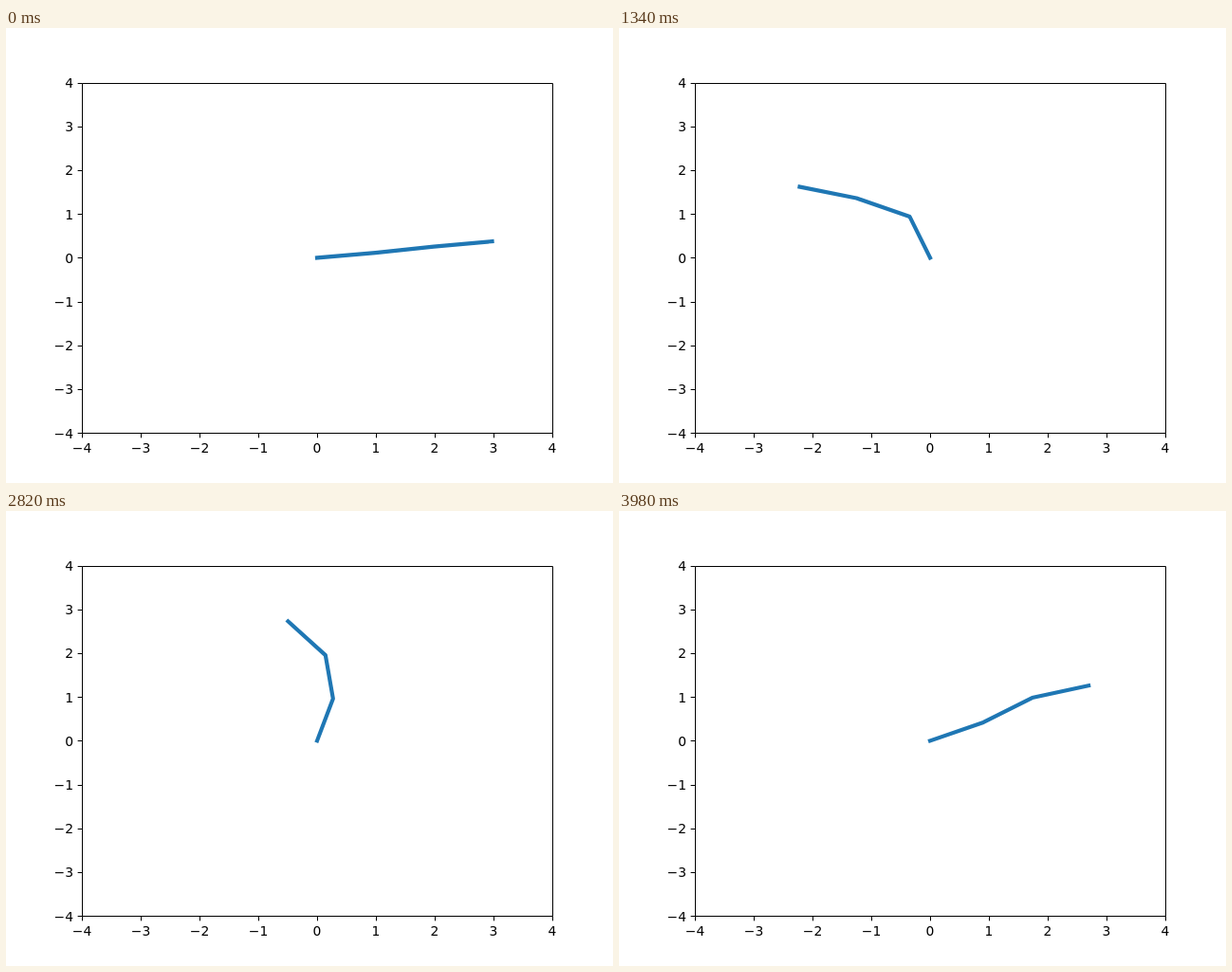
An HTML page for the animation above (4 s loop, 640 px wide and 480 px high).

```html
<!DOCTYPE html>
<html lang="en">
<head>
<meta charset="utf-8">
<title>Three-link arm</title>
<style>
  html, body { margin: 0; width: 100%; height: 100%; overflow: hidden; background: #fff; }
  svg { display: block; }
  text { font: 13.89px "DejaVu Sans", sans-serif; }
</style>
</head>
<body>
<svg width="640" height="480" viewBox="0 0 640 480">
  <polyline id="arm" fill="none" stroke="#1f77b4" stroke-width="4.17" stroke-linecap="square" stroke-linejoin="round"/>
  <path id="axes" fill="none" stroke="#000"/>
  <g id="labels"></g>
</svg>
<script>
const STEP = 20, STEPS = 200;
const px = x => 328 + 62 * x;
const py = y => 242.4 - 46.2 * y;
const $ = id => document.getElementById(id);

function drawAxes() {
  let path = 'M80.5 58.5H576.5V427.5H80.5Z', labels = '';
  for (let v = -4; v <= 4; v++) {
    const x = px(v), y = py(v);
    const label = String(v).replace('-', '\u2212');
    path += `M${x + .5} 427.5v4.86M80.5 ${Math.round(y) + .5}h-4.86`;
    labels += `<text x="${x}" y="448" text-anchor="middle">${label}</text>` +
              `<text x="71" y="${Math.round(y + 5.4)}" text-anchor="end">${label}</text>`;
  }
  $('axes').setAttribute('d', path);
  $('labels').innerHTML = labels;
}

// Key poses of the swing: step, then the direction of each link in radians.
const poses = [
  [0, .115, .14, .12],
  [26, .955, 1.134, .515],
  [54, 1.8, 2.265, 1.61],
  [67, 1.924, 2.704, 2.881],
  [110, 1.276, 2.894, 3.724],
  [141, 1.296, 1.7, 2.26],
  [177, .638, .863, 1.129],
  [199, .435, .594, .283]
];
const last = poses.length - 1;

const span = i => poses[i + 1][0] - poses[i][0];
const slope = (i, link) => (poses[i + 1][link] - poses[i][link]) / span(i);

// Angular speed at a pose, from the parabola through its neighbours.
function speed(i, link) {
  if (i === 0) return 2 * slope(0, link) - speed(1, link);
  if (i === last) return 2 * slope(last - 1, link) - speed(last - 1, link);
  const a = span(i - 1), b = span(i);
  return (slope(i - 1, link) * b + slope(i, link) * a) / (a + b);
}

// Cubic Hermite interpolation between poses.
function angle(n, link) {
  let i = 0;
  while (i < last - 1 && n >= poses[i + 1][0]) i++;
  const h = span(i), u = (n - poses[i][0]) / h, w = 1 - u;
  return poses[i][link] * w * w * (1 + 2 * u) + poses[i + 1][link] * u * u * (3 - 2 * u) +
         h * u * w * (speed(i, link) * w - speed(i + 1, link) * u);
}

function draw() {
  const n = Math.floor(performance.now() / STEP) % STEPS;
  let x = 0, y = 0, points = `${px(0)},${py(0)}`;
  for (let link = 1; link <= 3; link++) {
    const a = angle(n, link);
    x += Math.cos(a);
    y += Math.sin(a);
    points += ` ${px(x).toFixed(2)},${py(y).toFixed(2)}`;
  }
  $('arm').setAttribute('points', points);
  requestAnimationFrame(draw);
}

drawAxes();
draw();
</script>
</body>
</html>
```
